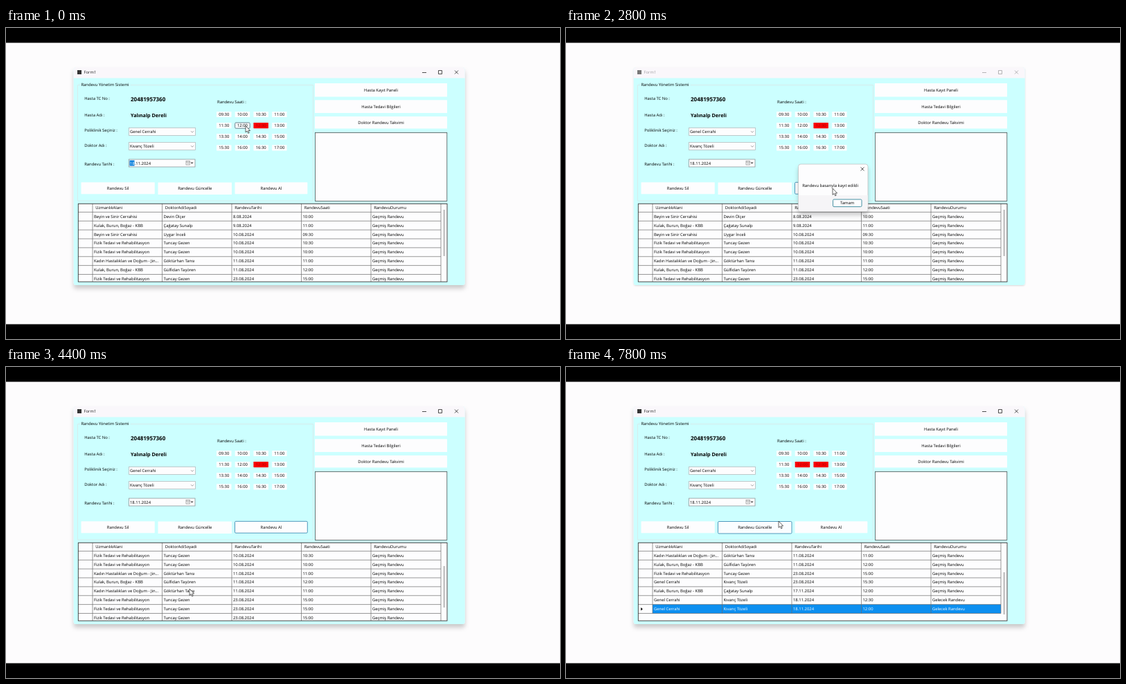
An HTML page for the animation above (8000 ms loop, 800 px wide and 450 px high).

```html
<!DOCTYPE html>
<html lang="tr">
<head>
<meta charset="utf-8">
<style>
  html, body { margin: 0; height: 100%; overflow: hidden; background: #fdfcfd; }
  svg { display: block; width: 100vw; height: 100vh; }
  text {
    font: 5.88px "Open Sans", "Noto Sans", sans-serif;
    fill: #000; white-space: pre; text-rendering: geometricPrecision;
  }
</style>
</head>
<body>
<svg id="stage" viewBox="0 0 800 450"></svg>
<script>
const LOOP = 8000, STEP = 200;
const stage = document.getElementById('stage');

// Building blocks; text y is the vertical middle of the line.
const rect = (x, y, x2, y2, fill, more = '') =>
  `<rect x="${x}" y="${y}" width="${x2 - x}" height="${y2 - y}" fill="${fill}" ${more}/>`;
const text = (x, y, s, more = '') => `<text x="${x}" y="${y + 2}" ${more}>${s}</text>`;
const mid = (x, y, s, more = '') => text(x, y, s, 'text-anchor="middle" ' + more);
const path = (d, stroke, w = 0.8, fill = 'none') =>
  `<path d="${d}" stroke="${stroke}" stroke-width="${w}" fill="${fill}"/>`;
const cross = (x, y, c) => path(`M${x - 2.5} ${y - 2.5}l5 5m0-5l-5 5`, c);

const DOCTOR = 'Kıvanç Tözeli';
const ENT = 'Kulak, Burun, Boğaz - KBB', BRAIN = 'Beyin ve Sinir Cerrahisi',
      PHYSIO = 'Fizik Tedavi ve Rehabilitasyon', SURGERY = 'Genel Cerrahi',
      BIRTH = 'Kadın Hastalıkları ve Doğum - Jin...';
const PAST = 'Geçmiş Randevu', NEXT = 'Gelecek Randevu';
const HEAD = ['UzmanlıkAlani', 'DoktorAdiSoyadi', 'RandevuTarihi', 'RandevuSaati', 'RandevuDurumu'];
const ROWS = [
  [BRAIN, 'Devin Ölçer', '8.08.2024', '10:00', PAST],
  [ENT, 'Çağatay Sunalp', '9.08.2024', '11:00', PAST],
  [BRAIN, 'Uygar İnceli', '10.08.2024', '09:30', PAST],
  [PHYSIO, 'Tuncay Gezen', '10.08.2024', '10:30', PAST],
  [PHYSIO, 'Tuncay Gezen', '10.08.2024', '10:00', PAST],
  [BIRTH, 'Göktürhan Tansı', '11.08.2024', '11:00', PAST],
  [ENT, 'Gülfidan Taşören', '11.08.2024', '12:00', PAST],
  [PHYSIO, 'Tuncay Gezen', '23.08.2024', '15:00', PAST],
  [SURGERY, DOCTOR, '23.08.2024', '15:30', PAST],
  [ENT, 'Çağatay Sunalp', '17.11.2024', '12:00', PAST],
  [SURGERY, DOCTOR, '18.11.2024', '12:30', NEXT],
  [SURGERY, DOCTOR, '18.11.2024', '12:00', NEXT]
];
const COLS = [125, 225.5, 326, 426.5, 527, 628];
const TOP = 266.4, PITCH = 12.87;

// Pointer keys: time, x, y
const MOVES = [
  [0, 346, 141.5], [200, 368, 139], [600, 368, 139], [1400, 395, 252.5], [1600, 391, 240],
  [2000, 345, 141], [2200, 364, 181], [2600, 384, 231], [2800, 385, 232], [3400, 413, 254],
  [3800, 413, 254], [4200, 265, 321], [4800, 265, 321], [5600, 214, 310], [6000, 218, 306],
  [6400, 342, 226], [7000, 119, 349], [7400, 119, 349], [7800, 307, 223]
];

function pointerAt(t) {
  const i = MOVES.findIndex(k => k[0] > t);
  if (i < 0) return MOVES.at(-1).slice(1);
  const [t0, x0, y0] = MOVES[i - 1], [t1, x1, y1] = MOVES[i];
  const p = (t - t0) / (t1 - t0);
  return [x0 + (x1 - x0) * p, y0 + (y1 - y0) * p];
}

function stateAt(t) {
  const [x, y] = pointerAt(t);
  return {
    x, y,
    dialog: t >= 600 && t < 1600 ? 1 : t >= 2800 && t < 3800 ? 2 : 0,
    focus: t < 200 ? 'date' : t < 2000 ? '12:30' : t < 2600 ? '12:00' : t < 7400 ? 'Randevu Al' : '',
    taken: t < 5000 ? ['12:30'] : ['12:30', '12:00'],
    scroll: t < 4400 ? 0 : t < 4600 ? 3 : 5,
    selected: t >= 7400 ? 11 : -1
  };
}

function button(s, x, y, x2, y2, label) {
  const hot = !s.dialog && s.x >= x && s.x <= x2 && s.y >= y - 0.6 && s.y <= y2;
  const busy = s.taken.includes(label), small = x2 - x < 30;
  const lit = hot || s.focus === label;
  const edge = !lit ? 'none' : small ? '#5d7480' : '#3f8db5';
  return rect(x, y, x2, y2, busy ? '#f80004' : hot ? '#fafdff' : '#fdfdfe',
      `rx="${lit ? 1.4 : 0.6}" stroke="${edge}" stroke-width=".9"`) +
    mid((x + x2) / 2, (y + y2) / 2, label, busy ? 'style="fill:#b00000"' : '');
}

function titleBar(s) {
  const c = s.dialog ? '#a3a1a4' : '#222';
  return rect(103, 61, 109, 67, s.dialog ? '#777' : '#333') +
    text(112.5, 64, 'Form1', `style="fill:${c}"`) +
    path('M601 64.5h6M624.5 61.5h5v5h-5z', c) + cross(650.5, 64, c);
}

function form(s) {
  let out = path('M106.5 82.5H103.5V250H443.5V82.5H180', '#d9e6e6') +
    text(108.4, 82.3, 'Randevu Yönetim Sistemi') +
    text(113.2, 102, 'Hasta TC No :') + text(113.2, 126, 'Hasta Adı :') +
    text(113.2, 148, 'Poliklinik Seçiniz :') + text(113.2, 169.5, 'Doktor Adı :') +
    text(113.2, 196.5, 'Randevu Tarihi :') + text(305, 107, 'Randevu Saati :') +
    text(180, 104.1, '20481957360', 'style="font-size:8px;font-weight:700"') +
    text(180, 126.6, 'Yalınalp Dereli', 'style="font-size:7.2px;font-weight:700"');

  [[150, SURGERY], [171, DOCTOR]].forEach(([y, label]) => {
    out += rect(177.5, y - 5.5, 273.5, y + 5.5, '#fdfdfe', 'stroke="#b5bcbe" stroke-width=".8"') +
      text(179, y, label) + path(`M267 ${y - 0.8}l2 2l2-2`, '#666', 0.6);
  });

  const picked = s.focus === 'date';
  out += rect(177.5, 190, 273, 201, '#fdfdfe', 'stroke="#8d9799" stroke-width=".8"') +
    (picked ? rect(178.5, 191.5, 185.5, 199.5, '#0a7fdc') : '') +
    text(179, 195.6, picked ? '<tspan style="fill:#fff">18</tspan>.11.2024' : '18.11.2024') +
    rect(260, 192.5, 265.5, 198, '#f4f4f4', 'stroke="#808080" stroke-width=".6"') +
    path('M260 194.2h5.5M262 196h2', '#808080', 0.6) + '<path d="M266.5 194.5h4l-2 2z" fill="#333"/>';

  for (let i = 0; i < 16; i++) {
    const minutes = 570 + i * 30;
    const label = String(Math.floor(minutes / 60)).padStart(2, '0') + (minutes % 60 ? ':30' : ':00');
    const x = 304 + (i % 4) * 26.7, y = 120.9 + Math.floor(i / 4) * 16.1;
    out += button(s, x, y, x + 21.5, y + 8.2, label);
  }

  out += button(s, 446, 80, 637, 99.5, 'Hasta Kayıt Paneli') +
    button(s, 446, 104.3, 637, 123, 'Hasta Tedavi Bilgileri') +
    button(s, 446, 128, 637, 145.5, 'Doktor Randevu Takvimi') +
    rect(446.5, 151.5, 636.8, 250.5, '#fdfdfe', 'stroke="#4a5252" stroke-width=".8"') +
    button(s, 108.5, 223.3, 214.8, 240.2, 'Randevu Sil') +
    button(s, 219.5, 223.5, 326, 241, 'Randevu Güncelle') +
    button(s, 330.5, 223.3, 435.3, 240.2, 'Randevu Al');
  return out;
}

function table(s) {
  // Halfway through the scroll the lower lines are not repainted yet.
  const shown = s.scroll === 3 ? [3, 4, 5, 6, 5, 7, 7, 7]
    : Array.from({ length: 8 }, (_, i) => i + s.scroll).filter(i => i < ROWS.length);
  const end = Math.min(367, TOP + shown.length * PITCH);
  let out = rect(104, 254, 637.5, 367.5, '#fdfdfe');
  HEAD.forEach((h, c) => out += text(COLS[c] + 4.2, 260.2, h));
  let grid = `M104 ${TOP}H628`;
  shown.forEach((n, i) => {
    const y = TOP + i * PITCH, on = n === s.selected;
    if (on) out += rect(125, y, 628, y + PITCH, '#0c8ff0') +
      `<path d="M108.2 ${y + 4.4}l2.6 2.2l-2.6 2.2z"/>`;
    ROWS[n].forEach((v, c) =>
      out += text(COLS[c] + 2, y + 6.4, v, on ? 'style="fill:#fff"' : ''));
    grid += `M104 ${y + PITCH}H628`;
  });
  COLS.forEach(x => grid += `M${x} 254V${end}`);
  const bar = { 0: [263, 330], 3: [288, 348], 5: [297, 358] }[s.scroll];
  return `<g clip-path="url(#grid)">${out}${path(grid, '#6c6c6c', 0.7)}</g>` +
    rect(104.3, 254.3, 637, 367.2, 'none', 'stroke="#333" stroke-width=".9"') +
    path(`M632.6 ${bar[0]}V${bar[1]}`, '#969696', 1.2);
}

function dialog(kind) {
  if (!kind) return '';
  const [x, x2, message] = kind === 1
    ? [341, 431.5, 'Bu saat için randevu dolu.']
    : [335.5, 436, 'Randevu basarıyla kayıt edildi'];
  return rect(x, 197, x2, 265.5, '#fdfdfe', 'rx="3.5" stroke="#b4b4b4" stroke-width=".6" filter="url(#deep)"') +
    `<path d="M${x + 0.3} 242H${x2 - 0.3}V262a3.2 3.2 0 0 1-3.2 3.2H${x + 3.5}a3.2 3.2 0 0 1-3.2-3.2z" fill="#f6f5f7"/>` +
    cross(x2 - 8, 204, '#333') + text(x + 5.7, 227.8, message) +
    rect(x2 - 50.5, 248, x2 - 9, 258.6, kind === 1 ? '#e2f1f8' : '#fdfdfe',
      'rx="1.5" stroke="#35879a" stroke-width=".9"') +
    mid(x2 - 29.8, 253.4, 'Tamam');
}

const defs = `<defs>
  <filter id="soft" x="-10%" y="-10%" width="120%" height="125%">
    <feDropShadow dx="0" dy="1" stdDeviation="1.2" flood-opacity=".14"/></filter>
  <filter id="deep" x="-20%" y="-20%" width="140%" height="150%">
    <feDropShadow dx="0" dy="5" stdDeviation="3" flood-opacity=".2"/></filter>
  <clipPath id="grid"><rect x="104" y="254" width="534" height="113.5"/></clipPath>
  <clipPath id="win"><rect x="97.7" y="57" width="565" height="315" rx="3.5"/></clipPath>
</defs>`;

function draw(t) {
  const s = stateAt(t);
  stage.innerHTML = defs + rect(0, 0, 800, 450, '#fdfcfd') +
    rect(0, 0, 800, 21.4, '#000') + rect(0, 428.6, 800, 450, '#000') +
    rect(97.7, 57, 662.7, 372, '#ccffff', `rx="3.5" filter="url(#${s.dialog ? 'soft' : 'deep'})"`) +
    `<g clip-path="url(#win)">${rect(97, 57, 663, 72.5, '#faf7fb')}</g>` +
    titleBar(s) + form(s) + table(s) + dialog(s.dialog) +
    `<g transform="translate(${s.x} ${s.y})">` +
    path('M0 0V9.4L2.2 7.5 3.7 10.8 5.2 10.1 3.8 7H6.6Z', '#222', 0.7, '#fff') + '</g>';
}

let last = -1;
function tick(now) {
  const step = Math.floor((now % LOOP) / STEP);
  if (step !== last) draw((last = step) * STEP);
  requestAnimationFrame(tick);
}
tick(performance.now());
</script>
</body>
</html>
```
